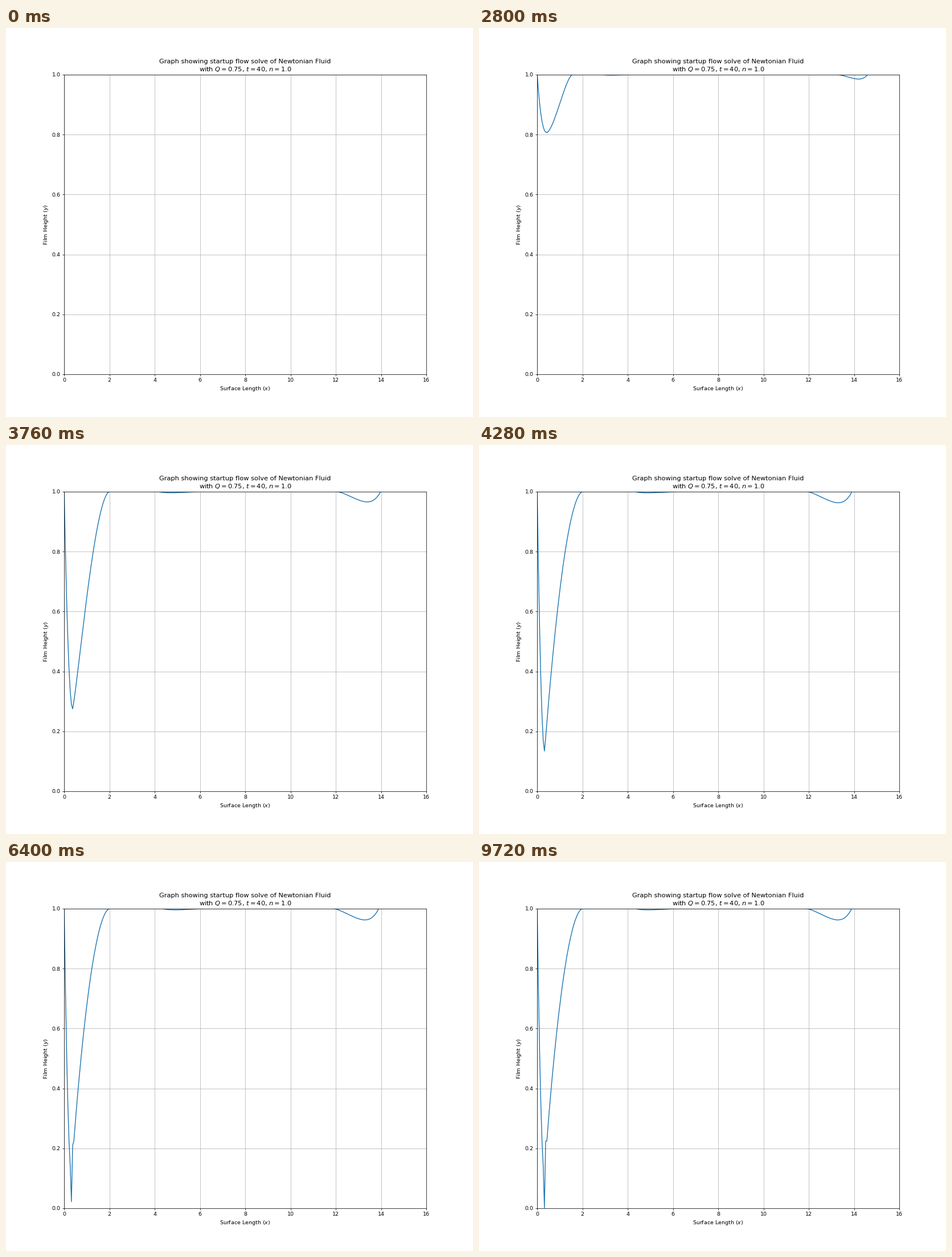
These frames come from a looping animation (820x683 px, 9920 ms). A matplotlib script:

```python
import numpy as np
import matplotlib.pyplot as plt
from matplotlib.animation import FuncAnimation

W, H, DPI = 820, 683, 68
FRAMES, INTERVAL = 248, 40
START = 8        # first frame with a visible film
RUPTURE = 94     # the film starts to break at one grid node
HEAL = 130       # the neighbouring node starts to recover
PIT = 6
HIDDEN = 1.01    # height just above the axes

x = np.linspace(0, 16, 301)


def saturate(n, rate, knee, sharp):
    """Exponential growth that levels off at 1 around the knee."""
    r = np.exp(rate * (n - knee))
    return r / (1 + r ** sharp) ** (1 / sharp)


def lobe(u, peak, depth):
    """Film height over one dip for u in 0..1; deeper dips are sharper."""
    fall = np.clip(u / peak, 0, 1)
    rise = np.clip((u - peak) / (1 - peak), 0, 1)
    shape = np.where(
        u < peak,
        1 - (1 - fall) ** (2.5 - 0.7 * depth),
        (1 - rise ** (1.6 - 0.8 * depth ** 2)) ** (1.6 + 0.35 * depth))
    return np.where((u >= 0) & (u <= 1), 1 - depth * shape, HIDDEN)


def inlet(n):
    width = 2.02 * saturate(n, 0.0195, 83, 12)
    depth = 0.89 * saturate(n, 0.07, 91.7, 2.5)
    h = lobe(x / width, 0.305 - 0.165 * depth, depth)
    if n > RUPTURE:
        h[PIT] = min(h[PIT], 0.275 * np.exp(-0.0385 * (n - RUPTURE)))
    if n > HEAL:
        healed = 1 - np.exp(-(n - HEAL) / 22)
        h[PIT + 1] += (h[PIT + 2] - h[PIT + 1]) * healed
    return h


def film(n):
    spread = saturate(n, 0.0255, 85.5, 6)
    reach = 2.1 * spread
    strength = spread ** 2.3
    outlet = lobe(((16 - x) / reach - 1) / 0.96, 0.32, 0.0375 * strength)
    ripple = lobe((x / (2.07 * reach) - 1) / 0.42, 0.32, 0.004 * strength)
    return np.minimum(inlet(n), np.minimum(outlet, ripple))


fig, ax = plt.subplots(figsize=(W / DPI, H / DPI), dpi=DPI)
fig.subplots_adjust(left=0.1246)
ax.set_xlim(0, 16)
ax.set_ylim(0, 1)
ax.grid(True)
ax.set_title("Graph showing startup flow solve of Newtonian Fluid\n"
             "with $Q=0.75$, $t=40$, $n=1.0$")
ax.set_xlabel("Surface Length ($x$)")
ax.set_ylabel("Film Height ($y$)")
line, = ax.plot([], [])


def update(n):
    if n < START:
        line.set_data([], [])
    else:
        line.set_data(x, film(n))
    return line,


anim = FuncAnimation(fig, update, frames=FRAMES, interval=INTERVAL,
                     repeat=True, repeat_delay=0)
plt.show()
```
